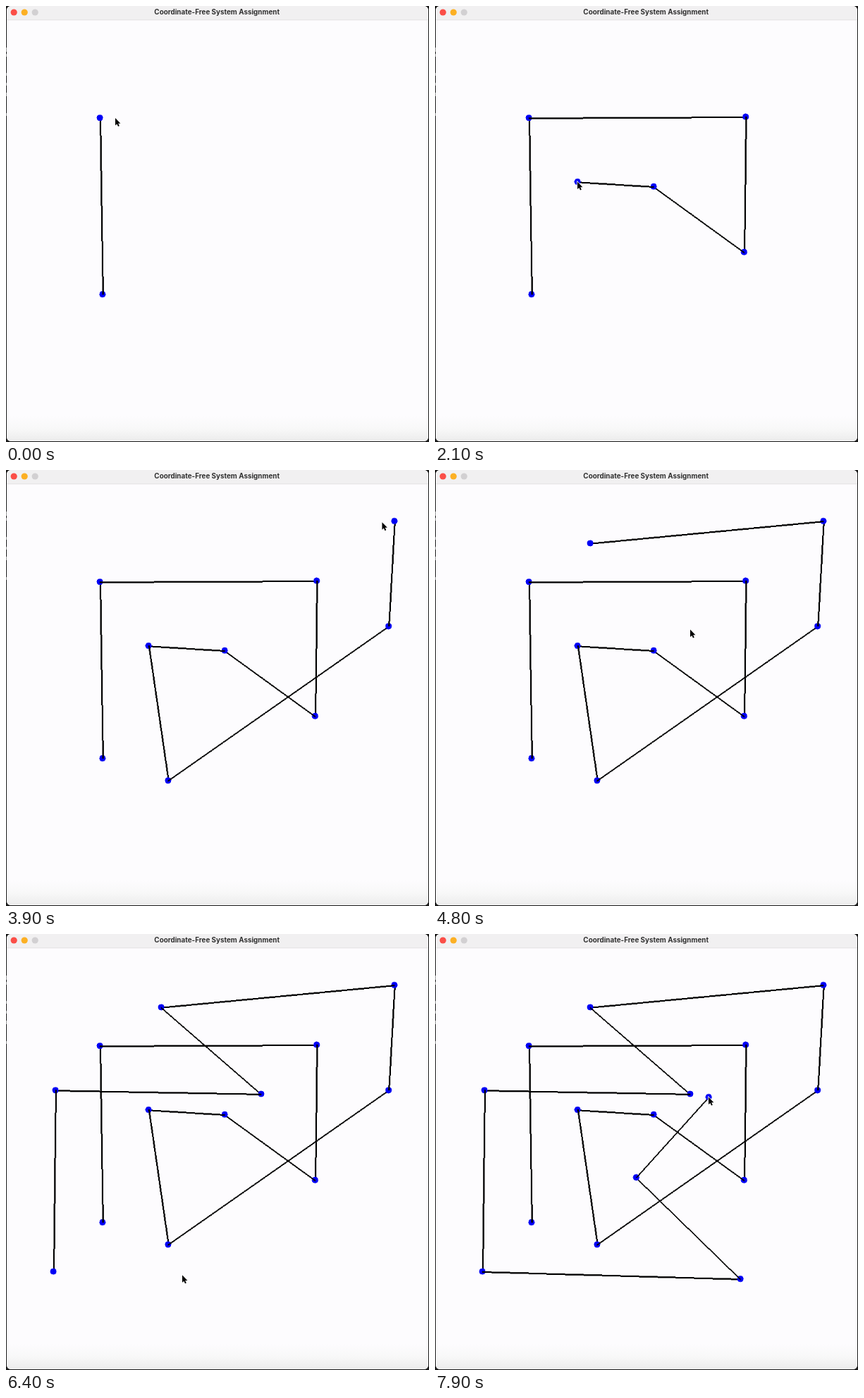
These frames come from a looping animation (600 by 619 pixels, 8 s). An HTML page with a canvas:

```html
<!DOCTYPE html>
<html lang="en">
<head>
<meta charset="utf-8">
<title>Point path</title>
<style>
  html, body { margin: 0; width: 100%; height: 100%; overflow: hidden; background: #1b1b1b; }
  svg, canvas { position: absolute; left: 0; top: 0; width: 100vw; height: 100vh; }
  .title { font: 700 9.85px Inter, sans-serif; fill: #303030; text-anchor: middle; }
</style>
</head>
<body>
<svg viewBox="0 0 600 619">
  <defs>
    <linearGradient id="shade" x1="0" y1="0" x2="0" y2="1">
      <stop offset="0" stop-color="#fdfcfe"/>
      <stop offset=".5" stop-color="#f8f8f8"/>
      <stop offset="1" stop-color="#ebebeb"/>
    </linearGradient>
    <clipPath id="window"><rect x="1" width="598" height="618" rx="6"/></clipPath>
  </defs>
  <rect width="600" height="619" fill="#1b1b1b"/>
  <path d="M.5 59v6M.5 68v4M.5 95v4M.5 109v4M.5 123v5M.5 152v4" stroke="#999"/>
  <g clip-path="url(#window)">
    <rect width="600" height="619" fill="#fdfcfe"/>
    <rect y="582" width="600" height="37" fill="url(#shade)"/>
    <rect width="600" height="20" fill="#f1f0f1"/>
    <path d="M0 19.8H600" stroke="#dfdedf" stroke-width=".8"/>
  </g>
  <circle cx="11.2" cy="9" r="4.6" fill="#fb4e47"/>
  <circle cx="26.2" cy="9" r="4.6" fill="#fcb024"/>
  <circle cx="41.2" cy="9" r="4.6" fill="#d2d0d2"/>
  <text class="title" x="299.2" y="12.4">Coordinate-Free System Assignment</text>
</svg>
<canvas id="drawing" width="800" height="825"></canvas>
<svg viewBox="0 0 600 619">
  <path id="cursor" d="M0 0V10.6L2.4 8.4L4 12L5.8 11.2L4.2 7.7H7.4Z"
        fill="#000" stroke="#fff" stroke-width="1.4" paint-order="stroke"/>
</svg>
<script>
const LOOP = 8000, TICK = 100;
const TRAVEL = 430, REST = 100; // time on the way, and still before a click
const PIXEL = 0.75;             // size of one hard-edged drawing pixel
const LINE = 3, RADIUS = 6;     // in drawing pixels

const click = (time, x, y, bend = 0) => ({ time, x, y, bend });
const clicks = [
  click(0, 137, 409), click(0, 133, 158.5), click(500, 440.5, 157),
  click(1100, 438.5, 349), click(1500, 310, 256), click(2100, 202, 249.5),
  click(2560, 229.5, 440.5), click(3080, 542.5, 221.5), click(3600, 551, 72.5),
  click(4370, 220, 104), click(4900, 362, 226.5), click(5600, 70, 221.5),
  click(6200, 67, 479), click(6700, 433, 489.5), click(7420, 285, 345, 0.24),
  click(7900, 388, 231.5)
];
const entry = click(0, 155, 159); // where the pointer begins

const canvas = document.getElementById("drawing");
const ctx = canvas.getContext("2d");
const cursor = document.getElementById("cursor");
const snap = ({ x, y }) => [Math.floor(x / PIXEL), Math.floor(y / PIXEL)];

// Line without antialiasing: one short bar for each step along its longer axis.
function drawLine([x0, y0], [x1, y1]) {
  const dx = x1 - x0, dy = y1 - y0;
  const steep = Math.abs(dy) > Math.abs(dx);
  const steps = Math.max(Math.abs(dx), Math.abs(dy));
  ctx.fillStyle = "#000";
  for (let i = 0; i <= steps; i++) {
    const x = Math.round(x0 + dx * i / steps), y = Math.round(y0 + dy * i / steps);
    ctx.fillRect(x, y, steep ? LINE : 1, steep ? 1 : LINE);
  }
}

function drawDot([x, y]) {
  ctx.fillStyle = "#0000f5";
  for (let row = -RADIUS; row <= RADIUS; row++) {
    const half = Math.floor(Math.sqrt(RADIUS ** 2 - row ** 2));
    ctx.fillRect(x - half, y + row, 2 * half + 1, 1);
  }
}

function drawPath(points) {
  ctx.clearRect(0, 0, canvas.width, canvas.height);
  points.map(snap).forEach((point, i, all) => {
    if (i) drawLine(all[i - 1], point);
    drawDot(point);
  });
}

function pointerAt(t) {
  const next = clicks.findIndex(c => c.time > t);
  if (next < 0) return [clicks.at(-1).x, clicks.at(-1).y];
  const to = clicks[next];
  const from = next === 2 ? entry : clicks[next - 1];
  const arrive = to.time - REST;
  const leave = Math.max(from.time, arrive - TRAVEL);
  const u = Math.min(1, Math.max(0, (t - leave) / (arrive - leave)));
  const ease = u * u * (3 - 2 * u);
  const swing = to.bend * Math.sin(Math.PI * ease);
  const dx = to.x - from.x, dy = to.y - from.y;
  return [from.x + dx * ease - dy * swing, from.y + dy * ease + dx * swing];
}

const start = performance.now();
let shown = 0;

function frame(now) {
  const elapsed = Math.max(0, now - start) % LOOP;
  const t = Math.floor(elapsed / TICK) * TICK;
  const placed = clicks.filter(c => c.time <= t);
  if (placed.length !== shown) {
    drawPath(placed);
    shown = placed.length;
  }
  cursor.setAttribute("transform", `translate(${pointerAt(t)})`);
  requestAnimationFrame(frame);
}
frame(start);
</script>
</body>
</html>
```
